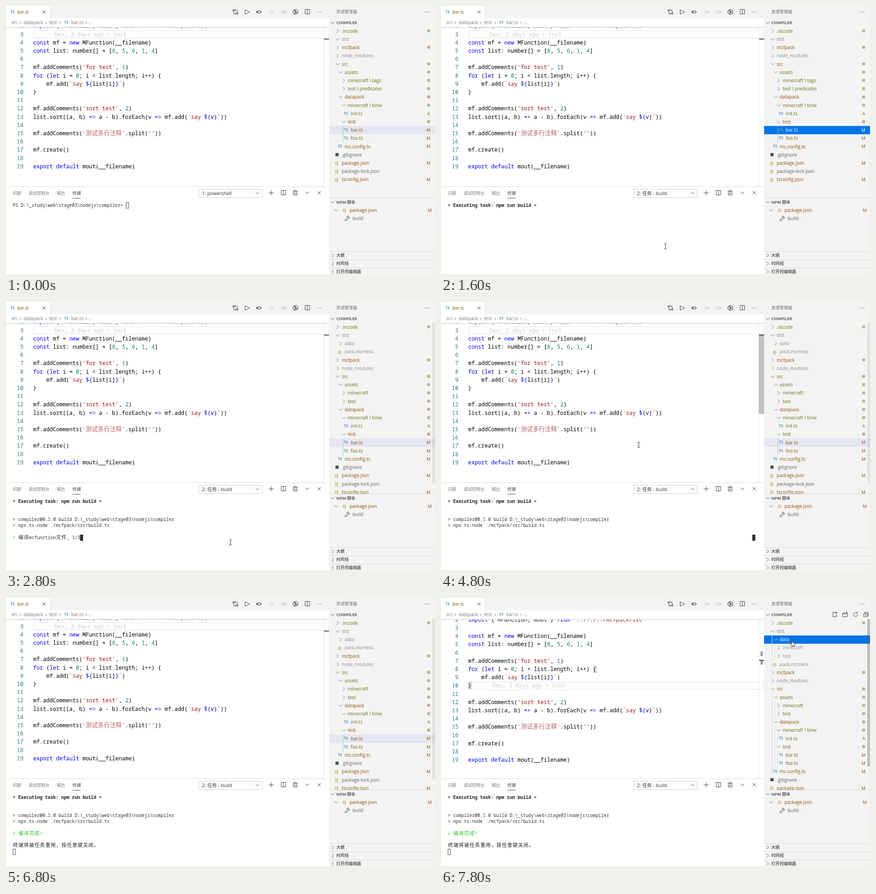
An HTML page with a canvas that plays this animation: 948x591 px, repeating every 8000 ms.

```html
<!DOCTYPE html>
<html lang="zh">
<head>
<meta charset="utf-8">
<title>Build task in an editor</title>
<style>
html, body { margin: 0; width: 100%; height: 100%; overflow: hidden; background: #fff; }
canvas { display: block; width: 948px; height: 591px; }
</style>
</head>
<body>
<canvas id="stage"></canvas>
<script>
const W = 948, H = 591, LOOP = 8000, STEP = 200;
const canvas = document.getElementById('stage');
const dpr = window.devicePixelRatio || 1;
canvas.width = W * dpr;
canvas.height = H * dpr;
const g = canvas.getContext('2d');

const UI = '"Open Sans", "Noto Sans CJK SC", "Noto Sans CJK", sans-serif';
const MONO = '"Noto Sans Mono", "DejaVu Sans Mono", monospace';
const CJK = '"Noto Sans CJK SC", "Noto Sans CJK", sans-serif';
const INK = '#424242', GREY = '#777', FOCUS = '#0074e8';
const TINT = { g: '#587c0c', a: '#587c0c', m: '#895503', i: '#8e8e90', n: '#616161' };
const ROW = 18.2;

function rect(x, y, w, h, color) {
  g.fillStyle = color;
  g.fillRect(x, y, w, h);
}

function box(x, y, w, h, color, lw = 1) {
  g.strokeStyle = color;
  g.lineWidth = lw;
  g.strokeRect(x, y, w, h);
}

function label(text, x, cy, color = INK, size = 10.1, style = '') {
  g.font = `${style} ${size}px ${UI}`;
  g.fillStyle = color;
  g.fillText(text, x, Math.round(cy + size * 0.34));
}

function icon(d, x, y, color = INK, lw = 1, fill) {
  g.save();
  g.translate(x, y);
  const p = new Path2D(d);
  if (fill) { g.fillStyle = fill; g.fill(p); }
  g.strokeStyle = color;
  g.lineWidth = lw;
  g.stroke(p);
  g.restore();
}

function dot(x, y, r, color) {
  g.fillStyle = color;
  g.beginPath();
  g.arc(x, y, r, 0, 7);
  g.fill();
}

const dots = (x, y) => [-4, 0, 4].forEach(d => dot(x + d, y, 0.8, INK));

const SHAPE = {
  right: 'M-2 -4L2 0L-2 4',
  down: 'M-4 -2L0 2L4 -2',
  up: 'M-4 2L0 -2L4 2',
  cross: 'M-3.5 -3.5L3.5 3.5M3.5 -3.5L-3.5 3.5',
  plus: 'M-5.5 0H5.5M0 -5.5V5.5',
  split: 'M-5 -5H5V5H-5ZM0 -5V5',
  play: 'M-4.5 -5L5 0L-4.5 5Z',
  ring: 'M3 0A3 3 0 1 0 -3 0A3 3 0 1 0 3 0',
  trash: 'M-5 -3.5H5M-2 -3.5V-5H2V-3.5M-4 -3.5V5H4V-3.5M-1.3 -1V3M1.3 -1V3',
  compare: 'M-4 -2V2Q-4 4 -2 4H1M-1 2L1 4L-1 6M4 2V-2Q4 -4 2 -4H-1M1 -6L-1 -4L1 -2M-5.5 -5H-2.5V-2H-5.5ZM2.5 2H5.5V5H2.5Z',
  wrench: 'M-5 3L0 -2Q-1 -5 2 -5.5L3 -5L1.5 -3L3 -1.5L5 -3Q6 0 2 1L-3 5Q-6 6 -5 3Z',
  newFile: 'M1 -5H-4V5H4V-1M1 -4H6M3.5 -6.5V-1.5',
  newFolder: 'M0 -3.5H-5.5V4.5H5.5V-1.5H-5.5M1 -4H6M3.5 -6.5V-1.5',
  refresh: 'M3 -3.5A4.5 4.5 0 1 0 4.5 0M3.5 -6V-3H0.5',
  collapse: 'M-5 -2H3V5H-5ZM-3 -2V-5H5V3H3M-3 1.5H1',
  beam: 'M-2.5 -5.5H-1L0 -5L1 -5.5H2.5M0 -5V5M-2.5 5.5H-1L0 5L1 5.5H2.5',
  hand: 'M-1 -6Q0 -7.5 1 -6V-1L5 0Q6 0.5 6 2L5 7H-1L-5 2Q-5 0 -3 1L-1 2Z'
};

// Monospaced text; wide glyphs take their own cell width.
function mono(text, x, y, cw, wide, color, weight = '') {
  g.fillStyle = color;
  for (const run of text.match(/[\u2e80-\uffef]|[^\u2e80-\uffef]+/g) || []) {
    if (/[\u2e80-\uffef]/.test(run)) {
      const size = Math.min(wide, cw * 1.84);
      g.font = `${weight && 500} ${size}px ${CJK}`;
      g.fillText(run, x + (wide - size) / 2, y);
      x += wide;
    } else {
      g.font = `${weight} ${cw / 0.6}px ${MONO}`;
      g.fillText(run, x, y);
      x += run.length * cw;
    }
  }
  return x;
}

const CODE = [
  "import { MFunction, mout } from '../../../mcfpack/src'",
  '',
  'const mf = new MFunction(__filename)',
  'const list: number[] = [8, 5, 6, 1, 4]',
  '',
  "mf.addComments('for test', 1)",
  'for (let i = 0; i < list.length; i++) {',
  '    mf.add(`say ${list[i]}`)',
  '}',
  '',
  "mf.addComments('sort test', 2)",
  'list.sort((a, b) => a - b).forEach(v => mf.add(`say ${v}`))',
  '',
  "mf.addComments('测试多行注释'.split(''))",
  '',
  'mf.create()',
  '',
  'export default mout(__filename)'
];
const TOKEN = /('[^']*'|`say |`|\$\{|\}(?=`)|[\u2e80-\uffef]+|\b(?:import|from|const|new|let|for|export|default)\b|=>|\b\d+\b)/;

function tokenColor(s) {
  if (/[\u2e80-\uffef]/.test(s)) return '#b8635f';
  if (/^['`]/.test(s)) return '#a31515';
  if (/^\d/.test(s)) return '#098658';
  return '#0000ff';
}

function drawCode(t) {
  const clicked = t >= 7000;
  const cw = 7.265, left = 60, shift = clicked ? 3.4 : 0;
  const lineY = n => 62.6 + shift + (n - 3) * ROW;
  g.save();
  g.beginPath();
  g.rect(0, 46, 714, 352);
  g.clip();
  const current = lineY(clicked ? 10 : 3);
  box(61, current - 8.2, 651.5, 16.4, '#ececec', 1.6);
  if (clicked) {
    for (const [n, col] of [[8, 38], [10, 0]]) {
      const x = left + col * cw, y = lineY(n) - 8;
      rect(x, y, 8, 16, '#e8f0e8');
      box(x + 0.5, y + 0.5, 7, 15, '#b9b9b9');
    }
  }
  CODE.forEach((line, i) => {
    const n = i + 2, y = Math.round(lineY(n) + 3.9);
    mono(String(n), 38.5 - String(n).length * cw, y, cw, 13.3, '#237893');
    let x = left;
    line.split(TOKEN).forEach((s, k) => {
      x = mono(s, x, y, cw, 13.3, k % 2 ? tokenColor(s) : '#000');
    });
  });
  mono('Dev, 2 days ago • init', clicked ? 114 : 107, Math.round(current + 3.9), cw, 13.3, '#cdcdcd');
  const shade = g.createLinearGradient(0, 46, 0, 50);
  shade.addColorStop(0, '#dddddd');
  shade.addColorStop(1, 'rgba(221,221,221,0)');
  rect(0, 46, 714, 4, shade);
  rect(702, 46, 1, 352, '#e4e4e4');
  if (t >= 4600 && t < 6400) rect(702, 71, 12, 176, '#c1c1c1');
  if (clicked) {
    rect(706, 118, 5, 10, '#a0a0a0');
    rect(706, 137, 5, 10, '#a0a0a0');
    rect(703, 136.5, 11, 2, '#424242');
  } else rect(703, 72, 11, 1.8, '#424242');
  g.restore();
}

function drawTabs() {
  rect(96, 0, 618, 27, '#f3f3f3');
  label('TS', 10, 13, '#519aba', 8, 'bold');
  label('bar.ts', 25, 13.5, '#895503', 10.1, 'italic');
  icon(SHAPE.cross, 84, 13);
  icon(SHAPE.compare, 507, 13);
  icon(SHAPE.play, 533, 13);
  const arrow = 'M-3 0H-6.5M-4 -2.5L-6.5 0L-4 2.5M3 0H6';
  icon(SHAPE.ring + arrow, 560, 13, INK, 1.2);
  icon(SHAPE.ring + 'M-6 0H-3M3 0H6', 587, 13, '#bcbcbc');
  icon(SHAPE.ring + 'M-6 0H-3M3 0H6.5M4 -2.5L6.5 0L4 2.5', 613, 13, '#bcbcbc');
  icon('M5.5 0A5.5 5.5 0 1 0 -5.5 0A5.5 5.5 0 1 0 5.5 0M-1 -5V5M-1 -2L2 1', 639.5, 13, INK, 1.2);
  dot(638.5, 10.5, 1.4, INK);
  dot(641.5, 14, 1.4, INK);
  icon(SHAPE.split, 666, 12.5);
  dots(692, 13);
  [['src', 12], ['datapack', 39], ['test', 95], ['bar.ts', 144], ['...', 183]]
    .forEach(([s, x]) => label(s, x, 37, GREY));
  label('TS', 128.5, 36.5, '#519aba', 8, 'bold');
  [31.5, 88.5, 119.5, 177].forEach(x => icon('M-1.5 -3L1.5 0L-1.5 3', x, 37, GREY));
}

function spinner(t) {
  const mark = '-\\|/'[(t / STEP + 3) % 4];
  const done = t < 4400 ? 1 : t < 5600 ? 2 : 3;
  return [mark, `编译mcfunction文件, ${done}/3`];
}

function drawPanel(t) {
  const cw = 5.95, wide = cw * 2, task = t >= 1200;
  const lineY = n => Math.round(439.6 + n * 13.3 + 3.3);
  const write = (s, n, color = '#333', weight, col = 0) =>
    mono(s, 15 + col * cw, lineY(n), cw, wide, color, weight);
  const block = (x, n) => rect(x, lineY(n) - 10, 6.5, 13.5, '#2b2b2b');
  const hollow = (x, n) => box(x + 0.5, lineY(n) - 9.5, 5.5, 12.5, '#444');

  rect(0, 398, 714, 1, '#dcdcdc');
  [['问题', 15], ['调试控制台', 50], ['输出', 112], ['终端', 147]]
    .forEach(([s, x]) => label(s, x, 413, x === 147 ? INK : GREY, 9.2));
  rect(147, 423.5, 18, 1, INK);
  box(426, 403.5, 140.5, 19, '#cecece');
  label(task ? '2: 任务 - build' : '1: powershell', 433, 413, '#333', 10.6);
  icon(SHAPE.down, 556, 412.5);
  icon(SHAPE.plus, 586, 412);
  icon(SHAPE.split, 613, 411.5);
  icon(SHAPE.trash, 639, 412);
  icon(SHAPE.up, 666, 412);
  icon(SHAPE.cross, 692, 412);

  if (!task) {
    write('PS D:\\_study\\web\\stage03\\nodejs\\compiler>', 0);
    hollow(265, 0);
    return;
  }
  write('> Executing task: npm run build <', 0, '#222', 'bold');
  if (t >= 1800) {
    write('> compiler@0.1.0 build D:\\_study\\web\\stage03\\nodejs\\compiler', 3);
    write('> npx ts-node ./mcfpack/src/build.ts', 4);
  }
  if (t >= 6400) {
    write('√ 编译完成!', 6, '#2cc42c');
    if (t >= 6800) {
      write('终端将被任务重用，按任意键关闭。', 8, '#222', 'bold');
      hollow(15, 9);
    } else block(15, 7);
  } else if (t === 4800) {
    block(688, 6);
  } else if (t >= 2600) {
    const [mark, text] = spinner(t);
    write(mark, 6, '#0598bc');
    block(write(text, 6, '#333', '', 2), 6);
  }
}

// Rows: depth, kind (> closed, v open, t/j/s file types), tint, name.
function treeRows(t) {
  const built = t >= 2600, opened = t >= 7800;
  return [
    '0 > g .vscode', '0 v i dist',
    ...(built ? [`1 ${opened ? 'v' : '>'} i data`] : []),
    ...(opened ? ['2 > i minecraft', '2 > i test'] : []),
    ...(built ? ['1 j i pack.mcmeta'] : []),
    '0 > m mcfpack', '0 > i node_modules', '0 v m src', '1 v g assets',
    ...(built ? ['2 > g minecraft', '2 > g test']
      : ['2 > g minecraft \\ tags', '2 > g test \\ predicates']),
    '1 v m datapack', '2 v g minecraft \\ time', '3 t a init.ts',
    '2 v m test', '3 t m bar.ts', '3 t m foo.ts', '1 t m mc.config.ts',
    '0 s n .gitignore', '0 j m package.json', '0 j n package-lock.json', '0 j m tsconfig.json'
  ];
}

function fileIcon(kind, x, y) {
  if (kind === 't') label('TS', x, y - 0.5, '#519aba', 8, 'bold');
  else if (kind === 'j') label('{}', x, y - 0.5, '#b7a82b', 9.5, 'bold');
  else rect(x + 1, y - 4, 7, 7, '#41535b');
}

const treeHovered = t => t >= 7200 || (t >= 400 && t < 1000);

function drawTree(t) {
  const rows = treeRows(t);
  const picked = t >= 7800 ? 'data' : t >= 7400 ? 'dist' : 'bar.ts';
  const focused = t >= 7400 || (t >= 1000 && t < 2000);
  g.save();
  g.beginPath();
  g.rect(714, 46, 234, 377);
  g.clip();
  rows.forEach((row, i) => {
    const [, d, kind, tint, name] = row.match(/^(\d) (.) (.) (.+)$/);
    const y = 55.3 + i * ROW, pad = d * 6.6;
    const hot = name === picked && focused;
    if (name === picked) rect(714, y - 9.1, 234, ROW, hot ? FOCUS : '#e4e6f1');
    const color = hot ? '#fff' : TINT[tint];
    const dir = kind === '>' || kind === 'v';
    if (treeHovered(t)) {
      for (let k = 0; k < d; k++) rect(Math.round(730.8 + k * 6.6), y - 9.1, 1, ROW, '#d6d6d6');
    }
    if (t < 7400 && /^(bar|foo)/.test(name)) rect(744, y - 9.1, 1, ROW, '#b5b5b5');
    if (dir) icon(kind === 'v' ? SHAPE.down : SHAPE.right, 733 + pad, y, hot ? '#fff' : '#777');
    else fileIcon(kind, 727 + pad, y);
    label(name, 742 + pad, y, color);
    if (dir && /[gm]/.test(tint)) {
      g.globalAlpha = 0.45;
      dot(934, y - 0.5, 3.4, color);
      g.globalAlpha = 1;
    }
    if (!dir && /[am]/.test(tint)) label(tint.toUpperCase(), tint === 'm' ? 929 : 931, y, color, 9.8);
  });
  const full = (rows.length + 1) * ROW;
  if (full > 377) rect(942, 46, 6, 377 * 377 / full, t >= 7200 ? 'rgba(100,100,100,.38)' : 'rgba(100,100,100,.12)');
  g.restore();
}

function drawSidebar(t) {
  rect(714, 0, 234, H, '#f3f3f3');
  label('资源管理器', 730, 13, '#6f6f6f', 9.2);
  dots(930, 13);
  icon(SHAPE.down, 722, 37, '#616161');
  label('COMPILER', 730, 37, '#616161', 9, 'bold');
  if (treeHovered(t)) {
    ['newFile', 'newFolder', 'refresh', 'collapse']
      .forEach((s, i) => icon(SHAPE[s], 870 + i * 23, 36.5));
  }
  drawTree(t);
  rect(714, 423, 234, 1, '#d9d9d9');
  icon(SHAPE.down, 722, 432.5, '#616161');
  label('NPM 脚本', 730, 432.5, '#616161', 9, 'bold');
  icon(SHAPE.down, 729.5, 450.5, GREY);
  fileIcon('j', 744, 450.5);
  label('package.json', 759, 450.5, TINT.m);
  label('M', 932, 450.5, TINT.m, 9.8);
  icon(SHAPE.wrench, 754, 468.5);
  label('build', 766, 468.5, '#616161');
  ['大纲', '时间线', '打开的编辑器'].forEach((s, i) => {
    const y = 550 + i * 18.1;
    rect(714, Math.round(y - 9.5), 234, 1, '#d9d9d9');
    icon(SHAPE.right, 722, y, '#616161');
    label(s, 730, y, '#616161', 9.1, 'bold');
  });
}

// Pointer keys: time, x, y.
const HAND_IN = [[200, 742, 330], [600, 870, 330], [1000, 931, 475]];
const BEAM = [[1400, 640, 515], [1600, 496, 530], [3200, 496, 530], [3800, 494, 500],
  [4400, 494, 500], [4800, 437, 315], [5200, 562, 282], [5800, 551, 110], [6400, 551, 110]];
const HAND_OUT = [[7200, 800, 110], [7400, 780, 81], [7600, 780, 81], [7800, 776, 99]];

function along(keys, t) {
  const i = keys.findIndex(k => k[0] >= t);
  if (i < 1) return keys[i < 0 ? keys.length - 1 : 0].slice(1);
  const [t0, x0, y0] = keys[i - 1], [t1, x1, y1] = keys[i];
  const k = (t - t0) / (t1 - t0);
  return [x0 + (x1 - x0) * k, y0 + (y1 - y0) * k];
}

function drawPointer(t) {
  if (t >= 1400 && t <= 6400) icon(SHAPE.beam, ...along(BEAM, t), '#222', 1);
  else if (t >= 7200) icon(SHAPE.hand, ...along(HAND_OUT, t), '#111', 1, '#fff');
  else if (t >= 200 && t <= 1200) icon(SHAPE.hand, ...along(HAND_IN, t), '#111', 1, '#fff');
}

function draw(now) {
  const t = Math.floor((now % LOOP) / STEP) * STEP;
  g.setTransform(dpr, 0, 0, dpr, 0, 0);
  rect(0, 0, W, H, '#fff');
  drawTabs();
  drawCode(t);
  drawPanel(t);
  drawSidebar(t);
  drawPointer(t);
}

const start = performance.now();
function tick() {
  draw(performance.now() - start);
  requestAnimationFrame(tick);
}
tick();
</script>
</body>
</html>
```
